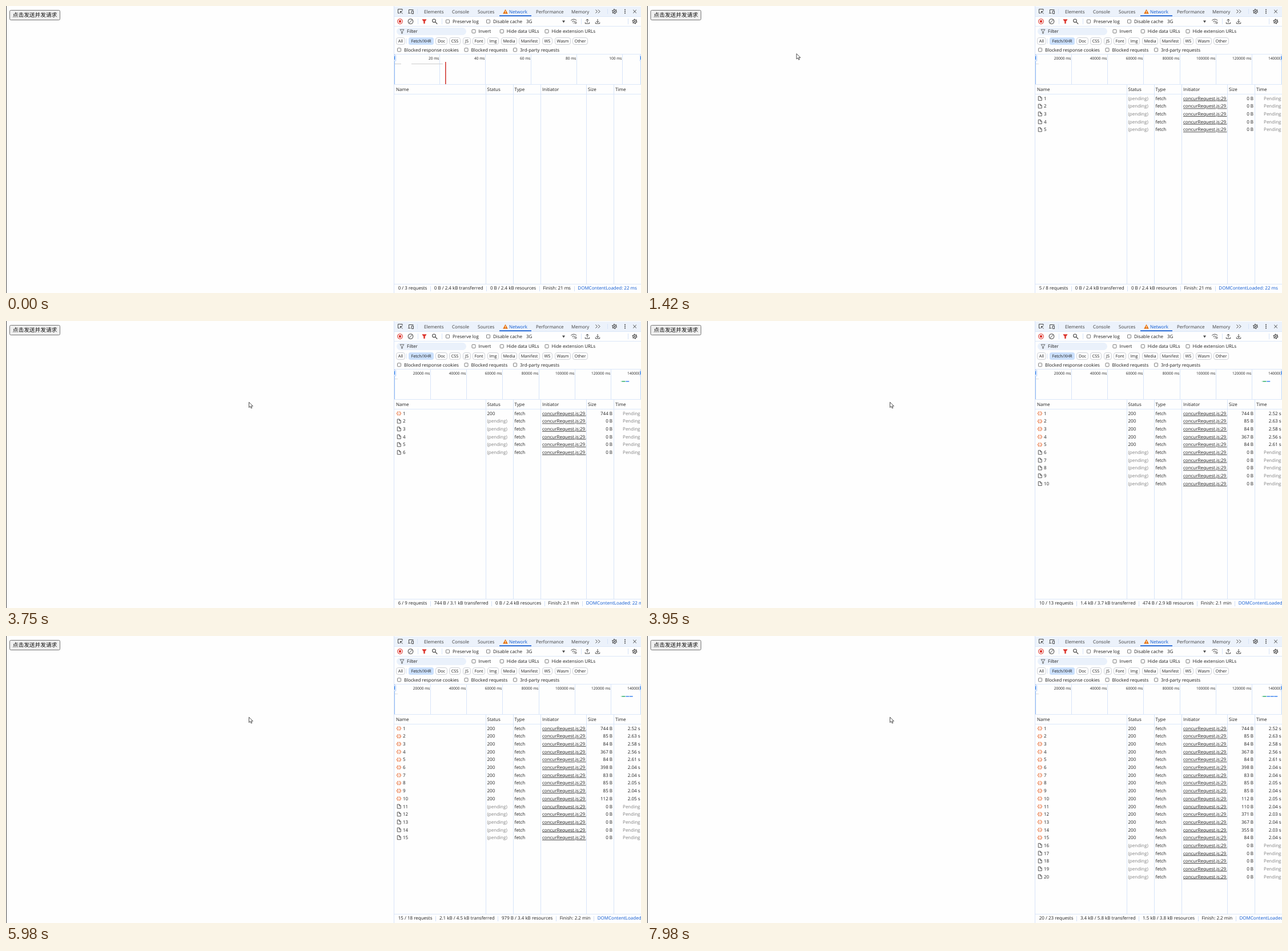
Recreate the animation shown at these times as an HTML page. Size 1112 px wide and 503 px high, loop 8 s.

```html
<!DOCTYPE html>
<html lang="zh-CN">
<head>
<meta charset="utf-8">
<title>Concurrent requests</title>
<style>
  html, body { margin: 0; width: 100%; height: 100%; overflow: hidden; background: #fefefe; }
  body { position: relative; font: 8px "Open Sans", "Noto Sans", sans-serif; color: #1f1f1f; text-rendering: geometricPrecision; }
  svg { position: absolute; left: 0; top: 0; fill: none; }
  text { fill: #1f1f1f; white-space: pre; }
  .tab { fill: #3c3c3c; }
  .blue { fill: #0b57d0; color: #0b57d0; }
  .muted { fill: #808080; }
  .small { font-size: 6.6px; }
  .chip { font-size: 7.3px; text-anchor: middle; }
  .end { text-anchor: end; }
  .link { text-decoration: underline; }
  .button { font: 9.7px "Noto Sans CJK SC", "Noto Sans CJK", sans-serif; fill: #111; }
  #status { position: absolute; left: 681px; top: 488px; width: 431px; height: 15px; line-height: 15px; display: flex; align-items: center; overflow: hidden; white-space: nowrap; }
  #status span { flex: none; height: 9px; line-height: 8px; padding: 0 5.7px; border-left: 1px solid #d3e0f5; }
  #status span:first-child { border: 0; }
</style>
</head>
<body>
<svg width="1112" height="503" viewBox="0 0 1112 503">
  <defs><clipPath id="initiator"><rect x="937" y="150" width="78.5" height="340"/></clipPath></defs>
  <g id="panel"></g>
  <g id="overview"></g>
  <g id="rows"></g>
  <g id="button"></g>
  <path id="cursor" d="M0 0V9.3L2.2 7.3 3.8 10.7 5.3 10 3.8 6.8H6.9Z" fill="#fff" stroke="#222" stroke-width=".8"/>
</svg>
<div id="status"></div>
<script>
const LOOP = 8000, CLICK = 1230;
const $ = id => document.getElementById(id);

const text = (x, y, s, cls = '') => `<text x="${x}" y="${y}" class="${cls}">${s}</text>`;
const rect = (x, y, w, h, fill, extra = '') => `<rect x="${x}" y="${y}" width="${w}" height="${h}" fill="${fill}" ${extra}/>`;
const path = (d, stroke = '#474747', width = 1, fill = 'none') =>
  `<path d="${d}" stroke="${stroke}" stroke-width="${width}" fill="${fill}"/>`;
const circle = (x, y, r, extra) => `<circle cx="${x}" cy="${y}" r="${r}" ${extra}/>`;
const hline = y => rect(680, y, 432, 1, '#dbe7f9');
const vline = (x, y, h, color = '#d7e4f8') => rect(x, y, 1, h, color);
const outline = (x, y, w, h, r, stroke, fill = 'none') =>
  rect(x + .5, y + .5, w - 1, h - 1, fill, `rx="${r}" stroke="${stroke}"`);

const checkbox = (x, y, label) =>
  rect(x + .5, y - 6, 6, 6, '#fff', 'rx="1" stroke="#6e6e6e" stroke-width=".9"') + text(x + 12, y, label);
const gear = (x, y) =>
  circle(x, y, 3.7, 'stroke="#474747" stroke-width="1.4" stroke-dasharray="1.9 1.97"') +
  circle(x, y, 2.9, 'stroke="#474747"') + circle(x, y, 1.2, 'fill="#474747"');
const funnel = (x, y, color, solid) =>
  path(`M${x - 3.5} ${y - 3.3}h7l-2.7 3.6v3.2h-1.6v-3.2z`, color, .8, solid ? color : 'none');
const arrow = (x, y, dir) =>
  path(`M${x} ${y + 2 * dir}V${y - 4 * dir}m-2.4 ${2.4 * dir}L${x} ${y - 4 * dir}l2.4 ${2.4 * dir}M${x - 3.7} 28.5v2.3h7.4v-2.3`);

function drawPanel() {
  const tabs = [[732, 'Elements'], [781, 'Console'], [826, 'Sources'], [928, 'Performance'], [990, 'Memory']];
  const chips = [[683, 16, 'All'], [705, 44, 'Fetch/XHR'], [752, 21, 'Doc'], [776, 20, 'CSS'], [800, 14, 'JS'],
    [817, 22, 'Font'], [843, 20, 'Img'], [867, 28, 'Media'], [898, 37, 'Manifest'], [939, 18, 'WS'],
    [961, 28, 'Wasm'], [992, 27, 'Other']];
  const columns = [[683, 'Name'], [842.5, 'Status'], [890.5, 'Type'], [939, 'Initiator'], [1019, 'Size'], [1067, 'Time']];

  return [
    rect(0, 0, 1, 503, '#4a4a4a'),
    vline(679, 0, 503),
    rect(680, 1, 432, 17, '#ecf2fb'),
    [18, 35, 84, 137, 154, 487].map(hline).join(''),

    // Tab bar
    path('M689 12.5h-2.5v-7h7.5v2.7M694.5 13.5l-4-4m0 3.3v-3.3h3.3'),
    path('M705.5 11.5v-5h8M704 12.5h4.5M710.5 8.5h3v5h-3z'),
    vline(720, 5, 9), vline(1053, 5, 9),
    tabs.map(([x, s]) => text(x, 12.8, s, 'tab')).join(''),
    path('M870.7 13.3h7.6l-3.8-7z', '#e8710a', .6, '#e8710a'),
    rect(874, 8.6, 1, 2.4, '#fff'), rect(874, 11.6, 1, .9, '#fff'),
    text(881, 12.8, 'Network', 'blue'),
    rect(864, 16.4, 56, 1.6, '#0b57d0'),
    path('M1032.5 6.5l3 3-3 3M1037 6.5l3 3-3 3'),
    gear(1065.5, 9.5),
    [6.5, 9.5, 12.5].map(y => circle(1084, y, .9, 'fill="#333"')).join(''),
    path('M1098.2 6.8l5.6 5.6m0-5.6l-5.6 5.6'),

    // Toolbar
    circle(690, 27, 4.3, 'stroke="#dc362e" stroke-width="1.1"'), rect(688, 25, 4, 4, '#dc362e'),
    circle(708.5, 27, 4.3, 'stroke="#474747" stroke-width="1.1"'), path('M705.5 30l6-6'),
    vline(721, 22, 10), funnel(732.5, 27, '#dc362e', true),
    circle(749.5, 25.8, 2.8, 'stroke="#474747" stroke-width="1.1"'), path('M751.6 27.9l3.6 3.6', '#474747', 1.2),
    vline(763, 22, 10),
    checkbox(770, 30, 'Preserve log'), checkbox(841, 30, 'Disable cache'),
    text(911, 30, '3G'), path('M974 25.5h5l-2.5 4z', 'none', 0, '#474747'),
    path('M989.2 25.3q5-4.3 10 0M991.2 27.4q2.5-2.2 5 0M993 29.2l1.2 1.3'), circle(997.5, 29.3, 1.5, 'stroke="#474747"'),
    vline(1007, 22, 10), arrow(1018, 27, 1), arrow(1036, 25, -1),
    vline(1089, 22, 10), gear(1101, 27),

    // Filters
    rect(684, 38, 122, 13, '#eaf1fb', 'rx="6.5"'), funnel(693.5, 44.5, '#474747'), text(702, 47.3, 'Filter'),
    checkbox(815.5, 47.3, 'Invert'), checkbox(864.8, 47.3, 'Hide data URLs'), checkbox(943.5, 47.3, 'Hide extension URLs'),
    chips.map(([x, w, s], i) => (i === 1
      ? rect(x, 55, w, 13, '#cbe0fc', 'rx="3.5"')
      : outline(x, 55, w, 13, 3.5, '#cfd2d8')) + text(x + w / 2, 63.9, s, 'chip')).join(''),
    vline(701, 57, 9),
    checkbox(685, 79.8, 'Blocked response cookies'), checkbox(802.5, 79.8, 'Blocked requests'), checkbox(888, 79.8, '3rd-party requests'),

    // Table head
    columns.map(([x, s]) => text(x, 149.4, s)).join(''),
    [840, 888, 936, 1016, 1064].map(x => vline(x, 138, 349)).join('')
  ].join('');
}

// Each request: bytes, seconds, moment the response arrives
const requests = [
  [744, 2.52, 3750], [85, 2.63, 3950], [84, 2.58, 3820], [367, 2.56, 3820], [84, 2.61, 3880],
  [398, 2.04, 5790], [83, 2.04, 5850], [85, 2.05, 5910], [85, 2.04, 5850], [112, 2.05, 5980],
  [110, 2.04, 7930], [371, 2.03, 7930], [367, 2.04, 7980], [355, 2.03, 7930], [84, 2.04, 7980]
].map(([size, secs, at], i) => ({
  size, secs, at,
  doneAt: i % 5 ? at : at + 50,
  body: [94.8, 101, 97][i / 5 | 0]
}));

const bytes = n => n < 1000 ? Math.round(n) + ' B' : (n / 1000).toFixed(1) + ' kB';
const total = (list, key) => list.reduce((sum, r) => sum + r[key], 0);

function drawOverview(clicked, finished) {
  const step = clicked ? 63.25 : 79.8, unit = clicked ? 20000 : 20;
  let out = '';
  for (let i = 1; i <= (clicked ? 7 : 5); i++) {
    const x = 680 + Math.floor(step * i);
    out += vline(x, 85, 52) + text(x - .5, 94, unit * i + ' ms', 'small end');
  }
  out += vline(680, 85, 52, '#8fb8f3') + vline(1111, 85, 52, '#c3d9f8');
  out += rect(680, 85.5, 3.5, 11.5, '#d3e3fd', 'rx="1.5"') + vline(680, 88, 6, '#1a73e8');
  out += rect(1109.5, 85.5, 4, 11.5, '#d3e3fd', 'rx="1.5"') + vline(1111, 88, 6, '#1a73e8');
  if (!clicked) {
    return out + rect(681, 101, 11, 1, '#ccc') + rect(710, 101, 55, 1, '#ccc') + rect(769, 98, 1.6, 39, '#d13b35');
  }
  out += rect(681, 101, 5, 1, '#ddd');
  if (finished) {
    out += rect(1076.5, 105, 2, 1.6, '#bfe6cf') + rect(1078.5, 105, 6, 1.6, '#3cb371');
    for (let i = 0; i < Math.ceil(finished / 5); i++) out += rect(1085.3 + 6.5 * i, 105, 5.9, 1.6, '#4a8df0');
  }
  return out;
}

function drawRow(i, t) {
  const y = +(164.8 + 13.67 * i).toFixed(2), r = requests[i];
  const arrived = r && t >= r.at, done = r && t >= r.doneAt;
  const icon = arrived
    ? path(`M687 ${y - 6.5}l-2.6 3.7 2.6 3.7M689 ${y - 6.5}l2.6 3.7-2.6 3.7M688 ${y - 4.6}v1.1m0 1.2v1.6`, '#e8713c', 1.1)
    : path(`M685.3 ${y - 6.4}h3.6l2.4 2.4v4.6h-6zM688.7 ${y - 6.3}v2.6h2.5`, '#474747', .9);
  return icon + text(695, y, i + 1) +
    text(842.5, y, arrived ? '200' : '(pending)', arrived ? '' : 'muted') +
    text(890.5, y, 'fetch') +
    `<g clip-path="url(#initiator)">${text(939, y, 'concurRequest.js:29.', 'link')}</g>` +
    text(1062, y, arrived ? r.size + ' B' : '0 B', 'end') +
    text(1110.5, y, done ? r.secs.toFixed(2) + ' s' : 'Pending', done ? 'end' : 'end muted');
}

function drawNetwork(t) {
  const clicked = t >= CLICK;
  const arrived = requests.filter(r => t >= r.at), done = requests.filter(r => t >= r.doneAt);
  const count = clicked ? 5 + arrived.length : 0, page = 2376;
  const sent = total(arrived, 'size'), loaded = total(done, 'body');
  const finish = !arrived.length ? '21 ms' : done.length > 5 ? '2.2 min' : '2.1 min';

  $('overview').innerHTML = drawOverview(clicked, arrived.length && Math.max(done.length, 1));
  $('rows').innerHTML = Array.from({ length: count }, (_, i) => drawRow(i, t)).join('');
  $('status').innerHTML = [
    `${count} / ${count + 3} requests`,
    `${bytes(sent)} / ${bytes(sent + page)} transferred`,
    `${bytes(loaded)} / ${bytes(loaded + page)} resources`,
    `Finish: ${finish}`
  ].map(s => `<span>${s}</span>`).join('') + '<span class="blue">DOMContentLoaded: 22 ms</span>';
}

// Pointer moves: start, end, steps, from, to
const moves = [
  [90, 850, 15, [707, 94], [68.5, 17.5]],
  [1290, 1640, 6, [68.5, 17.5], [416.5, 136.5]],
  [2325, 2490, 3, [416.5, 136.5], [425.5, 142.3]]
];

function pointer(t) {
  const move = moves.findLast(m => t >= m[0]);
  if (!move) return null;
  const [start, end, steps, from, to] = move;
  const p = Math.min(1, Math.floor((t - start) / (end - start) * steps + 1e-6) / steps);
  const eased = 1 - (1 - p) ** 2;
  return from.map((v, k) => v + (to[k] - v) * eased);
}

function drawButton(hover) {
  return outline(6, 7, 89, 18, 2, hover ? '#4f4f4f' : '#767676', hover ? '#e5e5e5' : '#efefef') +
    text(11.8, 19.4, '点击发送并发请求', 'button');
}

const changes = [CLICK, ...requests.flatMap(r => [r.at, r.doneAt])];
let lastStage, lastHover;

function render(t) {
  const stage = changes.filter(at => t >= at).length;
  if (stage !== lastStage) drawNetwork(t);
  lastStage = stage;

  const at = pointer(t);
  const hover = !!at && at[0] < 95 && at[1] < 25;
  if (hover !== lastHover) $('button').innerHTML = drawButton(hover);
  lastHover = hover;
  $('cursor').setAttribute('visibility', at ? 'visible' : 'hidden');
  if (at) $('cursor').setAttribute('transform', `translate(${at})`);
}

$('panel').innerHTML = drawPanel();
const begin = performance.now();
function tick() {
  render((performance.now() - begin) % LOOP);
  requestAnimationFrame(tick);
}
tick();
</script>
</body>
</html>
```
